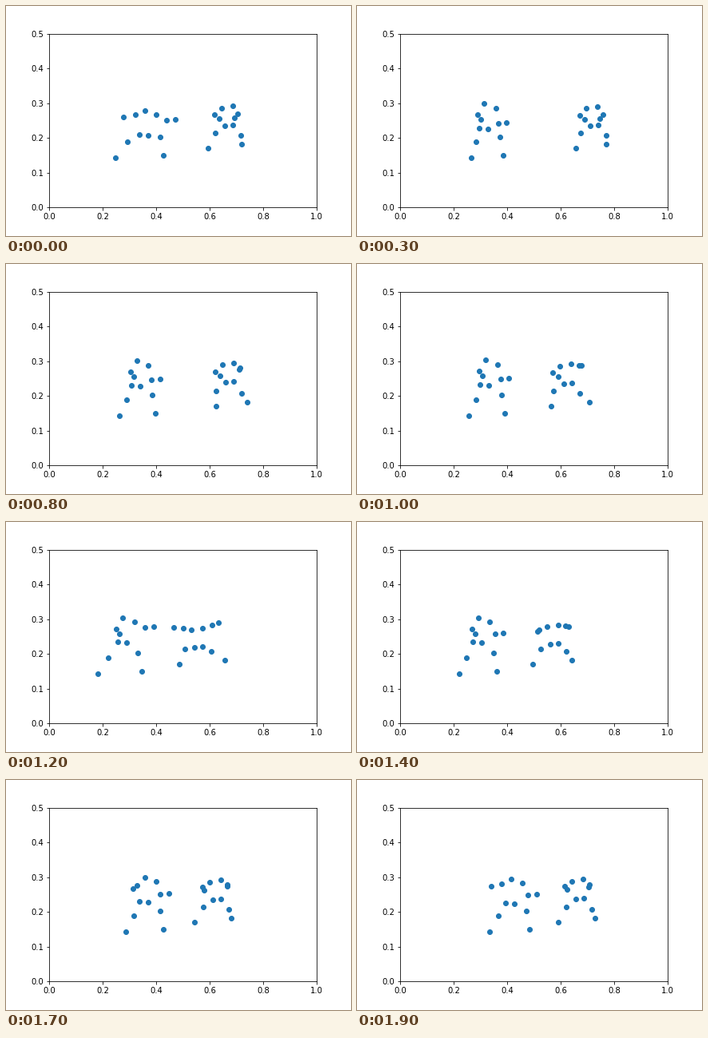
A matplotlib script that plays this animation: 432x288 px, repeating every 2000 ms.

```python
import numpy as np
import matplotlib.pyplot as plt
from matplotlib.animation import FuncAnimation

FRAMES, INTERVAL = 20, 100
W, H, DPI = 432, 288, 72
KEYS = [0, 3, 6, 10, 12, 15, 19]
LOST_FRAME = 15     # the tracker drops one wrist to the origin here


def track(frame, *values):
    return np.interp(frame, KEYS, values)


def arm(shoulder, spread, folded, spread_out):
    """Elbow and wrist; spread blends the folded and stretched limbs."""
    folded, spread_out = np.array(folded), np.array(spread_out)
    upper, fore = folded + spread * (spread_out - folded)
    elbow = shoulder + upper
    return [elbow + fore, elbow]


def left_body(frame):
    x = track(frame, 172.5, 158, 165.5, 160, 145, 153, 191.5)
    y = track(frame, 161.5, 153, 153, 151, 150.5, 150.5, 154.5)
    stride = track(frame, 36, 15, 21.5, 20, 30, 19, 25)
    spread_l = np.interp(frame, [0, 3, 15, 19], [1, 0, 0, 0.9])
    spread_r = track(frame, 1, 0, 0.1, 0.1, 1, 0.1, 0.4)

    # feet and knees keep their height while the hips move
    legs = [(x - stride, 190), (x - 0.57 * stride, 170),
            (x - 5.5, y - 0.5), (x + 5.5, y + 0.5),
            (x + 20.5, 163.5), (x + 24.5, 187)]
    chest = np.array([x + 8.5, y - 28])
    half = np.array([7.2, 2.8])
    wrist, elbow = arm(chest - half, spread_l,
                       [(-8, 14), (4, 6)], [(-12, 5), (-15, 3)])
    if frame == LOST_FRAME:
        wrist = np.array([54, 252])
    right = arm(chest + half, spread_r,
                [(3, 19), (10, -1)], [(13, 7), (11, -1)])
    return legs + [wrist, elbow, chest - half, chest + half] + right


def right_body(frame):
    x = track(frame, 279, 296.5, 296.5, 263.5, 241.5, 250, 278.5)
    y = track(frame, 149, 149.5, 146, 149, 156.5, 150.5, 148)
    back = track(frame, 26, 22.5, 14.5, 20.5, 24.5, 29, 26.5)
    front = track(frame, 16, 15.5, 16.5, 27.5, 32.5, 16, 19.5)
    spread_l = np.interp(frame, [10, 12, 15], [0, 1, 0.2])
    spread_r = track(frame, 0, 0, 0, 0.6, 1, 0.4, 0.25)

    legs = [(x - back, 178), (x - 17, 159),
            (x - 5, y + 0.5), (x + 5, y - 0.5),
            (x + 15, 162), (x + front, 173)]
    chest = np.array([x - 2.5, y - 22.6])
    half = np.array([7, -1.2])
    left = arm(chest - half, spread_l,
               [(-8.5, 8.5), (6, 5)], [(-10, -2), (-12, -1)])
    right = arm(chest + half, spread_r,
                [(6.5, 10), (-4, 5)], [(12, -4), (8, -3)])
    return legs + left + [chest - half, chest + half] + right


fig, ax = plt.subplots(figsize=(W / DPI, H / DPI), dpi=DPI)
fig.subplots_adjust(left=0.125, right=0.9, bottom=0.125, top=0.88)
ax.set_xlim(0, 1)
ax.set_ylim(0, 0.5)
dots = ax.scatter([], [], s=36, color="#1f77b4")
to_data = ax.transData.inverted()


def update(frame):
    pixels = np.array(left_body(frame) + right_body(frame))
    dots.set_offsets(to_data.transform(pixels * [1, -1] + [0, H]))
    return (dots,)


anim = FuncAnimation(fig, update, frames=FRAMES, interval=INTERVAL,
                     repeat=True, repeat_delay=0)
plt.show()
```
